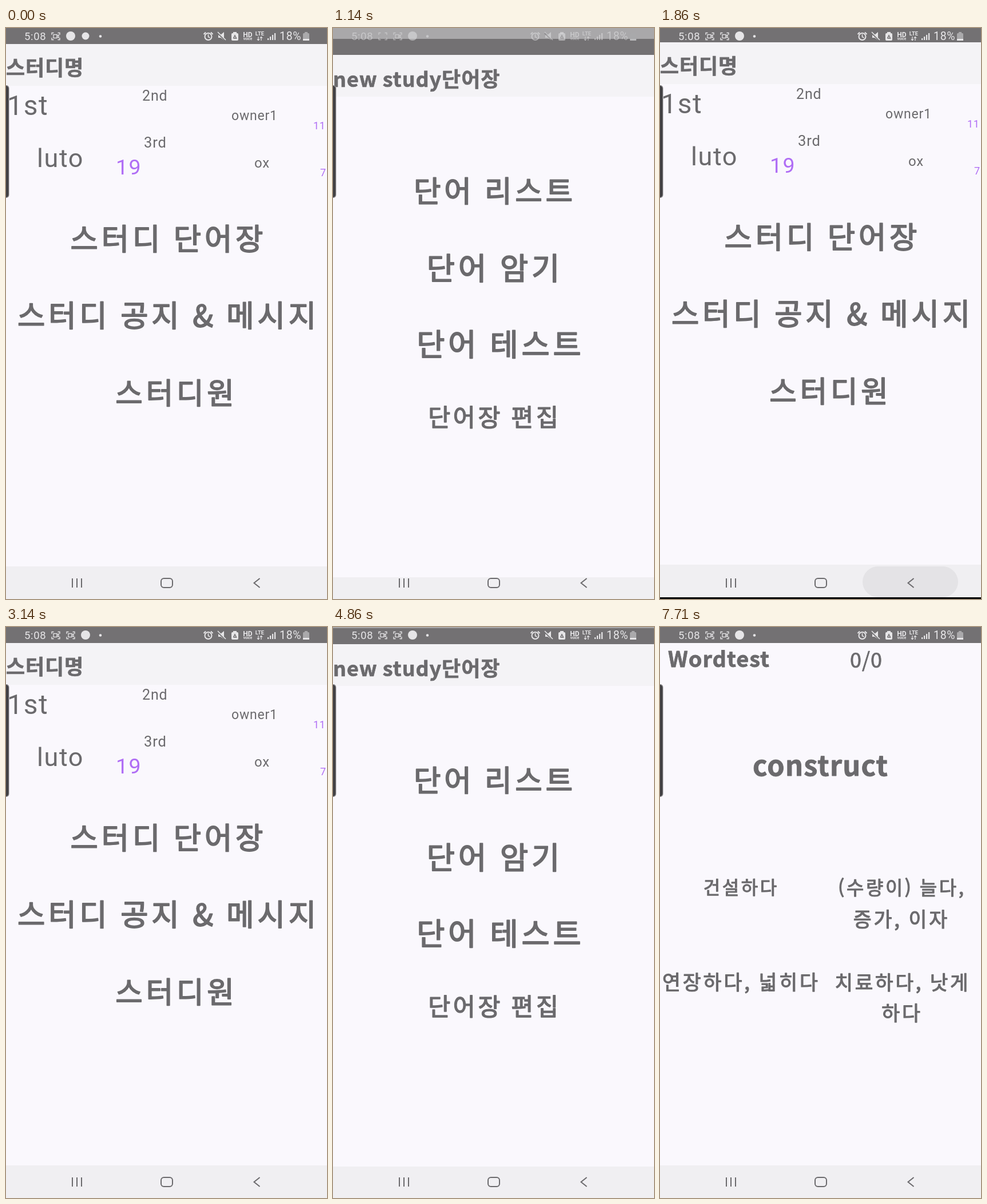
Recreate the animation shown at these times as an HTML page with a canvas. Size 561 by 998 pixels, loop 8000 ms.

```html
<!DOCTYPE html>
<html lang="ko">
<head>
<meta charset="utf-8">
<style>
html, body { margin: 0; width: 100%; height: 100%; overflow: hidden; background: #faf8fd; }
canvas { display: block; width: 561px; height: 998px; }
</style>
</head>
<body>
<canvas id="stage" width="561" height="998"></canvas>
<script>
const W = 561, H = 998, LOOP = 8000, FPS = 7;
const ctx = document.getElementById('stage').getContext('2d');
const INK = '#6b6a6d', BAR = '#737173', PAPER = '#faf8fd', HEADER = '#f4f3f6';
const NAV = '#f0eff2', PURPLE = '#b06ef5', LIGHT = '#e6e5e7';
const KR = '"Noto Sans CJK KR", "Noto Sans CJK", sans-serif';
const LATIN = 'Roboto, sans-serif';

// Moments at which a page opens or closes
const OPEN_LIST = 1069, CLOSE_LIST = 1722, OPEN_AGAIN = 4640, OPEN_QUIZ = 7397;
const SLIDE = 310;

const clamp = v => Math.max(0, Math.min(1, v));

function rect(x, y, w, h, color) {
  ctx.fillStyle = color;
  ctx.fillRect(x, y, w, h);
}

function round(x, y, w, h, r, color) {
  ctx.fillStyle = color;
  ctx.beginPath();
  ctx.roundRect(x, y, w, h, r);
  ctx.fill();
}

function disc(x, y, r, color) {
  ctx.fillStyle = color;
  ctx.beginPath();
  ctx.arc(x, y, r, 0, 7);
  ctx.fill();
}

function line(width, color, ...pts) {
  ctx.strokeStyle = color;
  ctx.lineWidth = width;
  ctx.beginPath();
  for (let i = 0; i < pts.length; i += 2) ctx.lineTo(pts[i], pts[i + 1]);
  ctx.stroke();
}

// space and bold are fractions of the font size
function text(str, x, y, size, { font = LATIN, weight = 400, color = INK, align = 'left', space = 0, bold = 0 } = {}) {
  ctx.font = `${weight} ${size}px ${font}`;
  ctx.letterSpacing = `${size * space}px`;
  ctx.fillStyle = ctx.strokeStyle = color;
  ctx.textAlign = align;
  if (align === 'center') x += size * space / 2;
  ctx.fillText(str, x, y);
  if (bold) {
    ctx.lineJoin = 'round';
    ctx.lineWidth = size * bold;
    ctx.strokeText(str, x, y);
    ctx.lineJoin = 'miter';
  }
}

// Hangul line centred on a point, airy and with a round pen
function label(str, x, y, size) {
  const s = size * 0.89;
  text(str, x, y + s * 0.37, s, { font: KR, align: 'center', space: 0.112, bold: 0.036 });
}

function heading(str, x, y, size, style = {}) {
  text(str, x, y, size, { font: KR, weight: 700, space: 0.025, bold: 0.02, ...style });
}

function name(str, x, y, size, color = INK) {
  text(str, x, y, size, { color, space: 0.035 });
}

function base() {
  rect(0, 0, W, H, PAPER);
  rect(0, 0, W, 28, BAR);
  rect(0, 941, W, 57, NAV);
}

function studyPage() {
  base();
  rect(0, 28, W, 73, HEADER);
  heading('스터디명', 0, 83, 36);
  name('1st', 2, 152, 48);
  name('2nd', 238, 127, 25);
  name('3rd', 241, 209, 25.5);
  name('luto', 54, 243, 45);
  name('owner1', 394, 161, 23);
  name('ox', 434, 244, 24);
  name('19', 192, 256, 37.5, PURPLE);
  name('11', 537, 177, 18, PURPLE);
  name('7', 549, 259, 18, PURPLE);
  label('스터디 단어장', 281, 369, 59);
  label('스터디 공지 & 메시지', 281, 503, 59);
  label('스터디원', 295, 638, 58);
}

function listPage() {
  base();
  rect(0, 28, W, 73, HEADER);
  heading('new study단어장', 0, 84, 36);
  label('단어 리스트', 280, 266, 58);
  label('단어 암기', 280, 401, 60);
  label('단어 테스트', 290, 534, 60);
  label('단어장 편집', 280, 661, 47.5);
}

function quizPage() {
  base();
  heading('Wordtest', 14, 70, 38);
  heading('0/0', 332, 71, 36, { weight: 400 });
  heading('construct', 280, 260, 48.5, { align: 'center' });
  label('건설하다', 140, 455, 36);
  label('(수량이) 늘다,', 421, 456, 37);
  label('증가, 이자', 420, 511, 39);
  label('연장하다, 넓히다', 140, 621, 39);
  label('치료하다, 낫게', 422, 621, 38.5);
  label('하다', 421, 675, 39);
}

function at(dy, alpha, page) {
  ctx.save();
  ctx.globalAlpha = alpha;
  ctx.translate(0, dy);
  page();
  ctx.restore();
}

// Quick start, long settling tail
function settle(ms) {
  if (ms >= SLIDE) return 1;
  const r = Math.pow(Math.max(0, ms) / 71, 2.7);
  return r / (1 + r);
}

function open(ms, from, to) {
  const p = settle(ms), dy = Math.round(41 * (1 - p));
  const shown = clamp((ms - 20) / 50);
  if (shown < 1) at(-Math.round(20 * p), 1, from);
  else rect(0, 0, W, H, '#a9a8aa');
  at(dy, shown, to);
  return dy * shown;
}

function close(ms, from, to) {
  const p = settle(ms);
  rect(0, 0, W, H, '#000');
  at(-Math.round(20.5 * (1 - p)), 1, to);
  if (ms < 70) at(Math.round(41 * p), 1 - clamp((ms - 20) / 50), from);
}

function pages(t) {
  if (t >= OPEN_QUIZ) return open(t - OPEN_QUIZ, listPage, quizPage);
  if (t >= OPEN_AGAIN) return open(t - OPEN_AGAIN, studyPage, listPage);
  if (t >= CLOSE_LIST) close(t - CLOSE_LIST, listPage, studyPage);
  else if (t >= OPEN_LIST) return open(t - OPEN_LIST, studyPage, listPage);
  else studyPage();
  return 0;
}

function recorder(x, lit) {
  for (const sx of [-1, 1]) for (const sy of [-1, 1]) {
    const cx = x + sx * 7, cy = 14.5 + sy * 6;
    line(1.3, LIGHT, cx - sx * 3.5, cy, cx, cy, cx, cy - sy * 3.5);
  }
  if (!lit) return;
  ctx.strokeRect(x - 4, 11.5, 6, 6);
  line(1.3, LIGHT, x + 2, 14, x + 5, 12, x + 5, 17, x + 2, 15);
}

function statusIcons(t) {
  name('5:08', 32, 21, 18.5, LIGHT);
  const lit = ((t - 855 + 1570) % 1570) >= 568;
  recorder(87, lit);
  if (t < 280) disc(113, 14, 8, LIGHT);
  else recorder(113, true);
  disc(139, 14, t < 280 ? 6.5 : 8, LIGHT);
  disc(165, 14.5, 2.3, LIGHT);

  // Alarm
  ctx.strokeStyle = LIGHT;
  ctx.lineWidth = 2;
  ctx.beginPath();
  ctx.arc(353.5, 15, 6, 0, 7);
  ctx.stroke();
  line(1.5, LIGHT, 353.5, 11, 353.5, 15.5, 356.5, 17);
  line(2, LIGHT, 345.5, 11, 349, 7.5);
  line(2, LIGHT, 358, 7.5, 361.5, 11);

  // Muted speaker
  ctx.fillStyle = LIGHT;
  ctx.beginPath();
  for (const [x, y] of [[371, 12], [375, 12], [381, 7], [381, 21], [375, 17], [371, 17]]) ctx.lineTo(x, y);
  ctx.fill();
  line(3, BAR, 370, 9, 384, 22);
  line(1.6, LIGHT, 370, 7, 384, 21);

  // Battery saver
  round(394, 9, 12, 13, 2, LIGHT);
  rect(397, 7, 6, 3, LIGHT);
  line(1.5, BAR, 397.5, 18, 400, 13, 402.5, 18, 397.5, 18);

  const small = { color: LIGHT, weight: 700, align: 'center' };
  text('HD', 422.5, 15.5, 12, small);
  text('voice', 422.5, 20.5, 6.5, small);
  text('LTE', 443.5, 13, 9.5, small);
  for (const [x, d] of [[441, 1], [446, -1]]) {
    line(1.2, LIGHT, x, 15, x, 22);
    line(1.2, LIGHT, x - 2, 18.5 + d, x, 18.5 + d * 3, x + 2, 18.5 + d);
  }
  for (let i = 0; i < 4; i++) rect(457 + i * 4, 18 - i * 3, 2.2, 3 + i * 3, LIGHT);
  name('18%', 478, 21, 19.5, LIGHT);

  round(519, 9, 11, 13, 1.5, '#aaa9ab');
  rect(522, 7, 5, 2, '#aaa9ab');
  rect(519, 19, 11, 3, LIGHT);
}

function navIcons(t) {
  if (t > 1560 && t < 2280) {
    ctx.globalAlpha = clamp((t - 1480) / 150) * clamp((2290 - t) / 400);
    round(354, 941, 167, 54, 27, '#e4e3e6');
    ctx.globalAlpha = 1;
  }
  for (const x of [116, 124, 132]) line(2, INK, x, 962, x, 978);
  ctx.beginPath();
  ctx.roundRect(271, 962, 20, 16, 5);
  ctx.stroke();
  line(2, INK, 443.5, 962, 433.5, 970, 443.5, 978);
}

function handle() {
  round(-8, 100, 13.5, 197, 5, '#8d8c8f');
  round(-8, 101, 12.5, 195, 5, '#414043');
}

function touch(x, y) {
  ctx.beginPath();
  ctx.ellipse(x, y, 15.5, 13.5, 0, 0, 7);
  ctx.fillStyle = 'rgba(252,251,254,.65)';
  ctx.fill();
  ctx.strokeStyle = '#d2d1d6';
  ctx.lineWidth = 2;
  ctx.stroke();
}

function fingers(t) {
  if (t > 850 && t < OPEN_LIST || t > 4420 && t < OPEN_AGAIN) touch(168, 367);
  if (t > 6700 && t < 6990) touch(143, 450);
  if (t > 7130 && t < OPEN_QUIZ) touch(168, 532);
}

function draw() {
  const now = performance.now() % LOOP;
  const t = Math.floor((now + 6) * FPS / 1000) * 1000 / FPS % LOOP;
  ctx.globalAlpha = 1;
  const dy = pages(t);
  ctx.globalAlpha = 1 - 0.5 * clamp((dy - 2) / 17);
  statusIcons(t);
  ctx.globalAlpha = 1;
  navIcons(t);
  handle();
  fingers(t);
  requestAnimationFrame(draw);
}
draw();
</script>
</body>
</html>
```
